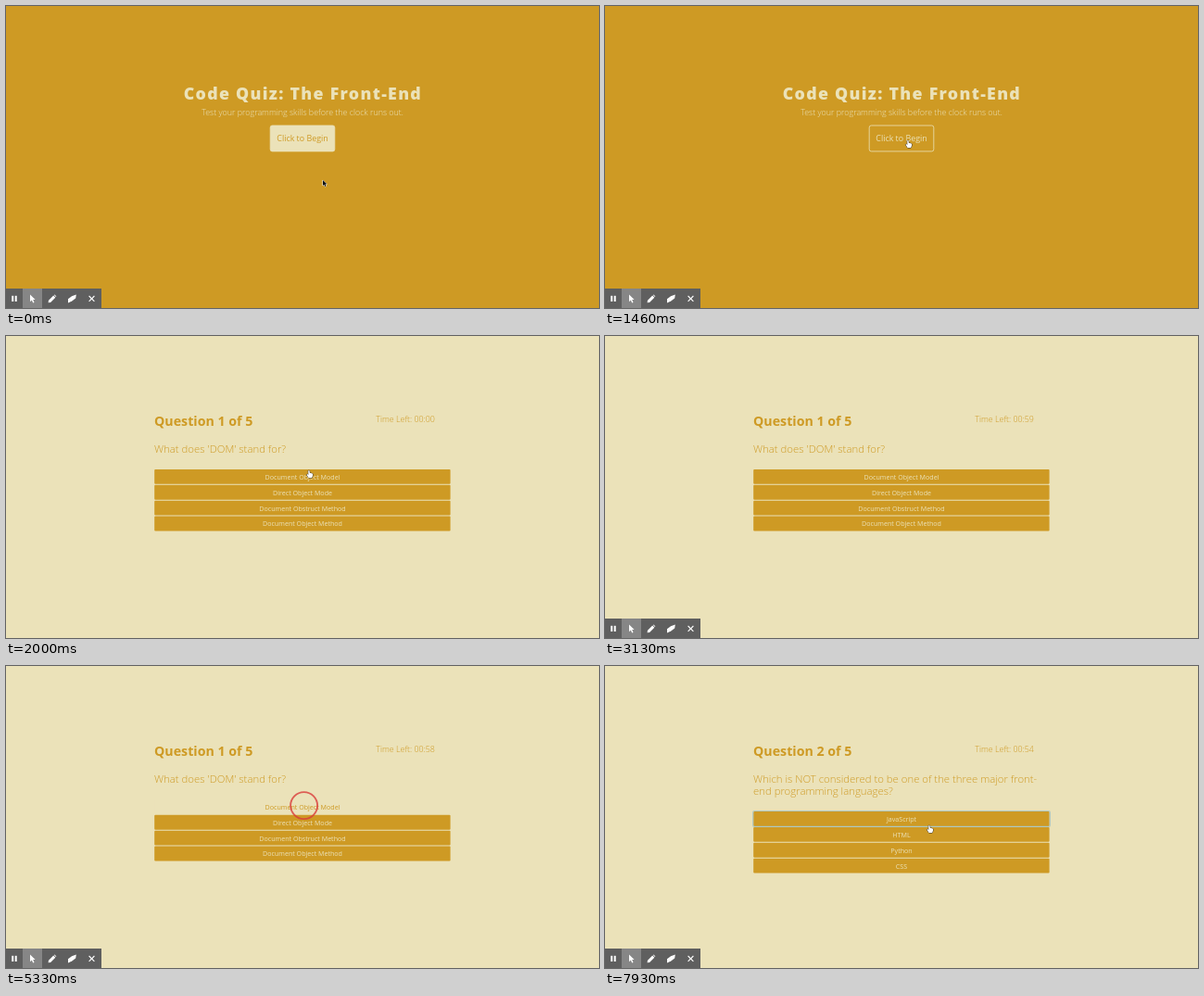
An HTML page with a canvas for the animation above (8 s loop, 640 by 326 pixels).

```html
<!DOCTYPE html>
<html lang="en">
<head>
<meta charset="utf-8">
<title>Code Quiz</title>
<style>
  html, body { margin: 0; width: 100%; height: 100%; overflow: hidden; background: #ce9a24; }
  canvas { display: block; width: 100vw; height: 100vh; }
</style>
</head>
<body>
<canvas id="stage"></canvas>
<script>
const W = 640, H = 326, LOOP = 8000;
const GOLD = [206, 154, 36], CREAM = [235, 226, 185];
const REM = 64 / 9; // 16px on a 1440px page shown 640px wide

// Times in ms
const QUIZ_START = 1950, TOOLBAR_BACK = 2230, NEXT_QUESTION = 6395;
const BEGIN_HOVER = 50, ANSWER_HOVER = 4174, ANSWER_LEAVE = 6434, FADE = 200;
const TICKS = [2930, 3930, 5600, 5930, 6990, 7900];

const QUESTIONS = [
  {
    lines: ["What does 'DOM' stand for?"],
    answers: ["Document Object Model", "Direct Object Mode", "Document Obstruct Method", "Document Object Method"]
  },
  {
    lines: ["Which is NOT considered to be one of the three major front-", "end programming languages?"],
    answers: ["JavaScript", "HTML", "Python", "CSS"]
  }
];

// Each point: time, x, y of the pointer tip
const ENTER_PATH = [[0, 342, 188], [50, 342, 187], [130, 338, 157], [260, 335, 150],
  [400, 335, 150], [460, 334, 149], [600, 334, 149], [1200, 327, 145], [3130, 327, 145]];
const RETURN_PATH = [[7000, 322, 149], [7200, 346, 64], [7400, 361, 116],
  [7650, 361, 118], [7800, 357, 146], [7920, 350, 172], [8000, 350, 172]];

const canvas = document.getElementById("stage");
const ctx = canvas.getContext("2d");

const clamp = v => Math.max(0, Math.min(1, v));
const fade = (t, start) => 1 - (1 - clamp((t - start) / FADE)) ** 2;
const rgb = c => `rgb(${c.map(Math.round).join(",")})`;
const mix = (a, b, k) => rgb(a.map((v, i) => v + (b[i] - v) * k));

function along(path, t) {
  let i = 1;
  while (i < path.length - 1 && path[i][0] < t) i++;
  const [t0, x0, y0] = path[i - 1], [t1, x1, y1] = path[i];
  const k = clamp((t - t0) / (t1 - t0));
  return [x0 + (x1 - x0) * k, y0 + (y1 - y0) * k];
}

function text(str, x, y, size, weight, color, align = "left", spacing = 0) {
  ctx.font = `${weight} ${size}px "Open Sans", sans-serif`;
  ctx.letterSpacing = spacing + "px";
  ctx.textAlign = align;
  ctx.fillStyle = color;
  ctx.fillText(str, x, y);
}

function box(x, y, w, h, r) {
  ctx.beginPath();
  ctx.roundRect(x, y, w, h, r);
}

function poly(points, fill, stroke, width = 1) {
  ctx.beginPath();
  points.forEach(([x, y]) => ctx.lineTo(x, y));
  ctx.closePath();
  if (stroke) {
    ctx.strokeStyle = stroke;
    ctx.lineWidth = width;
    ctx.lineJoin = "round";
    ctx.stroke();
  }
  ctx.fillStyle = fill;
  ctx.fill();
}

function background(color) {
  ctx.fillStyle = color;
  ctx.fillRect(0, 0, W, H);
}

function drawIntro(t) {
  const gold = rgb(GOLD), cream = rgb(CREAM), hover = fade(t, BEGIN_HOVER);
  background(gold);
  text("Code Quiz: The Front-End", 320.4, 100.5, 2.5 * REM, 800, cream, "center", 1.3);
  text("Test your programming skills before the clock runs out.", 320, 118, 1.25 * REM, 300, cream, "center");
  box(285.2, 129, 69.6, 27.9, 2.2);
  ctx.fillStyle = mix(CREAM, GOLD, hover);
  ctx.fill();
  ctx.strokeStyle = cream;
  ctx.lineWidth = 0.8;
  ctx.stroke();
  text("Click to Begin", 320, 146.2, 1.25 * REM, 400, mix(GOLD, CREAM, hover), "center");
}

function clock(t) {
  const passed = TICKS.filter(tick => t >= tick).length;
  return "00:" + String(passed ? 60 - passed : 0).padStart(2, "0");
}

function drawQuiz(t) {
  const gold = rgb(GOLD), index = t < NEXT_QUESTION ? 0 : 1;
  const { lines, answers } = QUESTIONS[index];
  const lineHeight = 13.1, top = 143.9 + index * lineHeight;
  const clear = index ? 1 - fade(t, ANSWER_LEAVE) : fade(t, ANSWER_HOVER);

  background(rgb(CREAM));
  text(`Question ${index + 1} of 5`, 160, 97, 2 * REM, 700, gold);
  text("Time Left: " + clock(t), 399.3, 93.2, 1.25 * REM, 300, gold);
  lines.forEach((line, i) => text(line, 160, 126 + i * lineHeight, 1.6 * REM, 300, gold));

  answers.forEach((answer, i) => {
    const y = top + i * 16.9, k = i ? 0 : clear;
    box(160.2, y, 319.4, 15.9, 1);
    ctx.fillStyle = mix(GOLD, CREAM, k);
    ctx.fill();
    text(answer, 320, y + 10.8, REM, 400, mix(CREAM, GOLD, k), "center");
  });

  if (index) {
    box(159.7, top - 0.5, 320.6, 16.9, 1.5);
    ctx.strokeStyle = "rgba(165,195,195,0.85)";
    ctx.lineWidth = 1.2;
    ctx.stroke();
  }
}

function drawToolbar() {
  const white = "#fff";
  ctx.fillStyle = "#5f5f5f";
  ctx.fillRect(0, 305, 103, 21);
  ctx.fillStyle = "#868686";
  ctx.fillRect(18, 305, 21, 21);

  ctx.fillStyle = white;
  ctx.fillRect(6.2, 312.8, 2, 6.2);
  ctx.fillRect(9.7, 312.8, 2, 6.2);

  poly([[26, 311.5], [26, 319.2], [27.8, 317.6], [29.2, 320.6], [30.5, 320], [29.2, 317.1], [31.6, 317]], white);
  poly([[45.6, 320.3], [46, 317.8], [51.2, 312.6], [53.3, 314.7], [48.1, 319.9]], white);
  poly([[51.8, 312], [52.5, 311.4], [54.4, 313.4], [53.8, 314.1]], white);
  poly([[67, 316.2], [71, 313.2], [75.8, 311.6], [75.2, 315.6], [71.2, 318.4], [67, 320.6]], white);

  ctx.strokeStyle = white;
  ctx.lineWidth = 1.1;
  ctx.beginPath();
  ctx.moveTo(89.6, 313);
  ctx.lineTo(95.4, 318.8);
  ctx.moveTo(95.4, 313);
  ctx.lineTo(89.6, 318.8);
  ctx.stroke();
}

function drawRing(t) {
  const size = Math.min(clamp((t - 4730) / 600), clamp((6910 - t) / 1310));
  if (size <= 0) return;
  ctx.beginPath();
  ctx.arc(321.6, 150.6, 14.5 * size, 0, Math.PI * 2);
  ctx.strokeStyle = `rgba(217,60,58,${0.6 + 0.2 * size})`;
  ctx.lineWidth = 0.6 + 1.3 * size;
  ctx.stroke();
}

function drawPointer(t) {
  if (t >= 3130 && t < 7000) return;
  const [x, y] = along(t < 7000 ? ENTER_PATH : RETURN_PATH, t);
  const hand = t < 7000 ? y < 157 : y > 157;
  ctx.save();
  ctx.translate(x, y);
  if (hand) {
    poly([[-0.8, 0.3], [0.6, 0.3], [0.8, 2.8], [3.8, 3.6], [4.2, 5], [3.2, 8], [-0.4, 8], [-2.5, 4.7], [-1.8, 4], [-0.6, 5]],
      "#fff", "#333", 1);
  } else {
    poly([[0, 0], [0, 6], [1.4, 4.8], [2.4, 7], [3.4, 6.5], [2.5, 4.4], [4.3, 4.3]], "#111", "#fff", 1);
  }
  ctx.restore();
}

function draw(t) {
  const scale = canvas.width / W;
  ctx.setTransform(scale, 0, 0, canvas.height / H, 0, 0);
  if (t < QUIZ_START) drawIntro(t);
  else drawQuiz(t);
  if (t < QUIZ_START || t >= TOOLBAR_BACK) drawToolbar();
  drawRing(t);
  drawPointer(t);
}

function resize() {
  const dpr = window.devicePixelRatio || 1;
  canvas.width = Math.round(innerWidth * dpr);
  canvas.height = Math.round(innerHeight * dpr);
}

function frame() {
  draw((performance.now() - start) % LOOP);
  requestAnimationFrame(frame);
}

addEventListener("resize", resize);
resize();
const start = performance.now();
frame();
</script>
</body>
</html>
```
